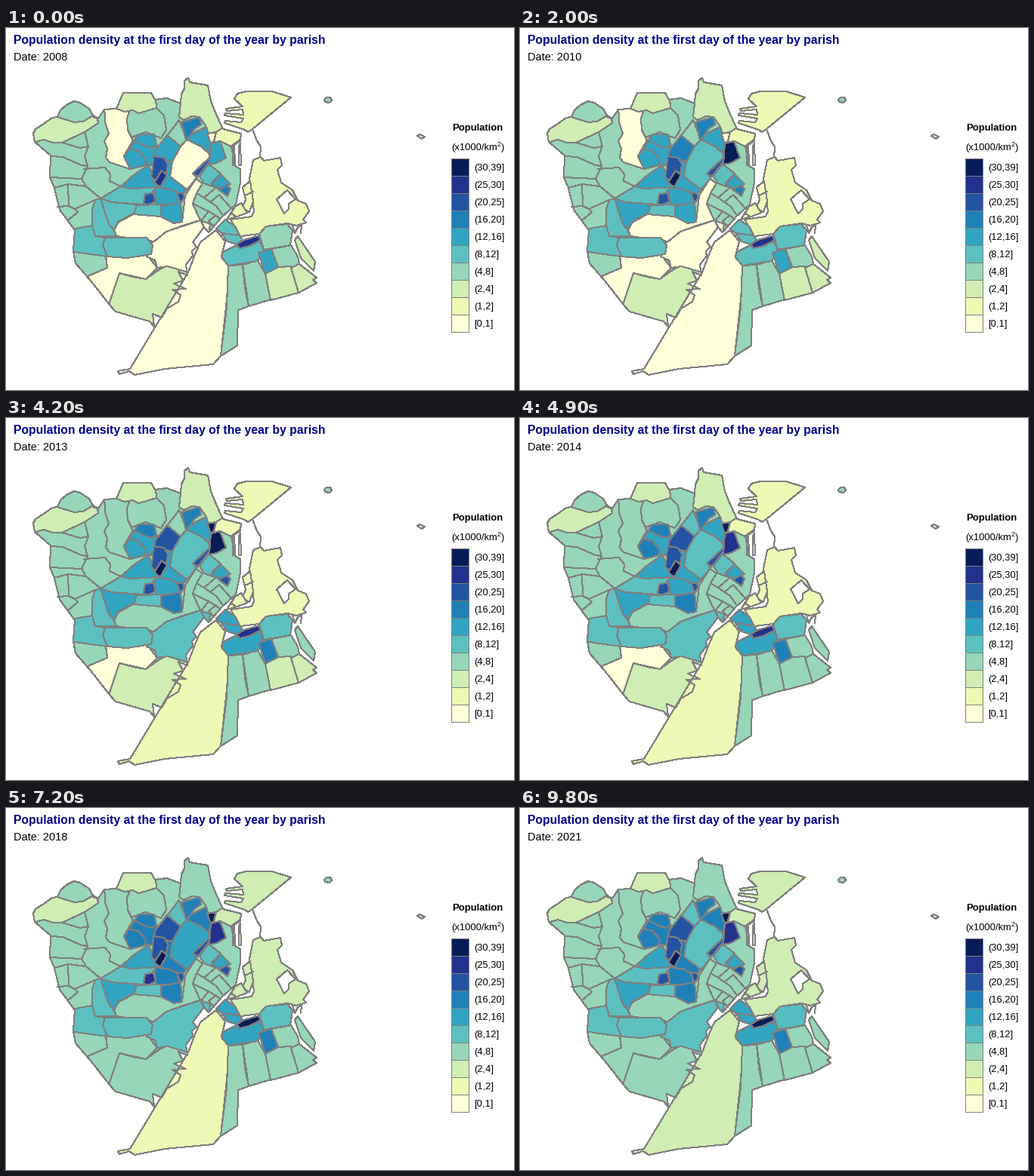
Recreate the animation shown at these times as a matplotlib script. Size 672x480 px, loop 10 s.

```python
import numpy as np
import matplotlib.pyplot as plt
from matplotlib.animation import FuncAnimation
from matplotlib.patches import Polygon, Rectangle

plt.rcParams["font.family"] = ["Liberation Sans", "DejaVu Sans"]

W, H, DPI = 672, 480, 96
STEP = 100
FRAMES = 100
PX = 72 / DPI
GREY = "#7f7f7f"
CMAP = plt.get_cmap("YlGnBu")
BOUNDS = [0, 1, 2, 4, 8, 12, 16, 20, 25, 30, 39]
# moments at which the next year takes over
SWITCH = [600 + 800 * min(k, 3) + 700 * max(k - 3, 0) for k in range(13)]


def shade(level):
    """Colour of a density class; fractions blend two neighbours."""
    return CMAP(level / 9)


fig = plt.figure(figsize=(W / DPI, H / DPI), dpi=DPI, facecolor="white")
ax = fig.add_axes([0, 0, 1, 1])
ax.set_xlim(0, W)
ax.set_ylim(H, 0)
ax.axis("off")

parishes = []


def area(*flat, color="white", clip=None):
    patch = Polygon(np.reshape(flat, (-1, 2)), closed=True, facecolor=color,
                    edgecolor=GREY, linewidth=PX, antialiased=False,
                    zorder=len(ax.get_children()))
    ax.add_patch(patch)
    if clip is not None:
        patch.set_clip_path(clip)
    return patch


def parish(level, *flat, to=None, blend=None, clip=None):
    patch = area(*flat, color=shade(level), clip=clip)
    parishes.append((patch, level, to or {}, blend or {}))
    return patch


def border(*flat):
    x, y = np.reshape(flat, (-1, 2)).T
    ax.plot(x, y, color=GREY, lw=PX, antialiased=False,
            zorder=len(ax.get_children()))


def text(x, y, s, size, **kw):
    return ax.text(x, y, s, fontsize=size * PX, va="baseline", **kw)


# --- mainland: one coast, districts are cut off along it
land = parish(
    3, 36, 140, 39, 134, 50, 127, 61, 119, 68, 118, 72, 109, 80, 102, 90, 97,
    98, 99, 110, 107, 115, 116, 122, 120, 130, 108, 146, 107, 155, 86, 192, 86,
    197, 95, 213, 93, 231, 100, 232, 88, 236, 80, 236, 70, 241, 66, 243, 72,
    267, 76, 271, 97, 277, 112, 287, 134, 311, 140, 310, 150, 298, 157,
    303, 183, 310, 187, 310, 205, 304, 234, 285, 251, 268, 271, 262, 264,
    247, 284, 252, 290, 246, 296, 247, 302, 238, 314, 240, 328, 228, 323,
    234, 335, 222, 339, 238, 346, 220, 347, 231, 354, 228, 363, 213, 372,
    206, 384, 194, 379, 196, 396, 190, 389, 145, 376, 137, 367, 112, 335,
    92, 312, 89, 296, 91, 268, 71, 241, 64, 212, 58, 198, 59, 169, 38, 151)

border(104, 138, 109, 157, 104, 170, 108, 183, 100, 200, 106, 210, 125, 226)
border(74, 152, 98, 159, 109, 157)
border(59, 170, 75, 171, 100, 182, 108, 183)
border(58, 198, 100, 200)
border(103, 187, 131, 185, 138, 194, 137, 203, 152, 210)
border(64, 212, 82, 207, 106, 210)
border(82, 207, 83, 236, 91, 240, 118, 228)
border(68, 237, 83, 236)
border(82, 255, 95, 244, 91, 240)
border(199, 106, 209, 116, 212, 135, 205, 146, 185, 138, 166, 145)

parish(2, 30, 120, 68, 118, 102, 124, 113, 117, 121, 120, 122, 126, 104, 138,
       74, 152, 62, 152, 50, 148, 36, 152, clip=land)
parish(3, 68, 118, 68, 90, 120, 90, 115, 116, 102, 124, 90, 125, clip=land,
       to={2015: 4, 2016: 3, 2019: 4, 2020: 3})
parish(0, 130, 100, 163, 111, 160, 120, 161, 135, 168, 149, 156, 170, 164, 187,
       137, 178, 132, 172, 134, 160, 130, 150, 136, 140, 131, 125,
       clip=land, to={2013: 3})
parish(2, 146, 107, 146, 80, 197, 80, 199, 106, 176, 113, 167, 109, 157, 111,
       clip=land)
parish(2, 231, 100, 231, 60, 275, 60, 300, 136, 266, 140, 265, 131, 256, 118,
       246, 117, 235, 122, 229, 118, clip=land, to={2018: 3})
parish(1, 271, 153, 278, 138, 290, 130, 320, 140, 298, 157, 283, 150,
       clip=land, to={2015: 2})

parish(0, 108, 329, 134, 318, 132, 303, 186, 300, 200, 318, 185, 333, 150, 325,
       137, 367, 100, 340, clip=land, to={2016: 3})
parish(2, 150, 325, 168, 330, 185, 333, 200, 322, 214, 314, 250, 325, 250, 400,
       125, 400, clip=land, to={2018: 3})
parish(0, 186, 290, 212, 270, 257, 255, 270, 260, 260, 330, 214, 316, 200, 318,
       197, 308, 186, 303, clip=land, to={2013: 4})
parish(0, 143, 268, 148, 258, 170, 246, 205, 250, 233, 257, 237, 222, 251, 200,
       260, 206, 252, 219, 247, 233, 257, 255, 234, 262, 212, 270, 196, 283,
       146, 276, to={2013: 3})
parish(3, 80, 295, 132, 302, 134, 318, 108, 329, 90, 330, clip=land)
parish(4, 80, 268, 114, 262, 118, 276, 131, 278, 128, 288, 134, 303, 105, 299,
       80, 295, clip=land)
parish(4, 131, 278, 186, 278, 194, 288, 192, 300, 160, 305, 134, 303, 128, 288)
parish(4, 118, 228, 125, 226, 133, 248, 146, 276, 118, 276, 114, 262, 114, 240)
parish(4, 125, 226, 152, 210, 199, 211, 182, 234, 140, 231)
parish(4, 173, 235, 206, 234, 205, 250, 168, 247)
parish(4, 125, 226, 140, 231, 173, 234, 170, 245, 148, 257, 143, 268, 136, 260,
       131, 245, to={2010: 5})

# --- dense centre
parish(3, 213, 143, 229, 122, 239, 148, 231, 158, to={2014: 4})
parish(0, 231, 157, 239, 148, 258, 157, 268, 166, 270, 172, 248, 193, 252, 199,
       239, 215, 226, 206, 217, 197, 220, 177,
       to={2009: 4, 2017: 5, 2021: 4}, blend={2016: 4.5})
parish(5, 152, 210, 170, 194, 188, 182, 203, 211, 165, 213)
parish(5, 211, 173, 220, 177, 217, 197, 239, 214, 234, 220, 203, 211,
       to={2015: 6})
parish(5, 197, 212, 215, 213, 226, 219, 230, 232, 216, 234, 198, 234,
       to={2015: 6})
parish(5, 205, 236, 231, 231, 233, 257, 222, 259, 205, 250, to={2011: 6})
parish(5, 163, 160, 170, 149, 200, 156, 193, 182, 184, 181, to={2015: 6})
parish(5, 163, 160, 175, 163, 185, 174, 184, 182, 164, 187, 156, 170,
       to={2014: 6})
parish(5, 170, 149, 175, 141, 196, 141, 199, 155, 193, 159, 183, 156,
       to={2011: 6})
parish(5, 197, 163, 213, 142, 231, 157, 220, 177, 196, 171,
       to={2010: 6, 2013: 7})
parish(7, 195, 170, 209, 172, 214, 180, 213, 190, 199, 205, 192, 197, 194, 186)
parish(8, 206, 189, 213, 195, 204, 211, 196, 205, to={2010: 9})
parish(7, 184, 220, 195, 219, 198, 230, 187, 235, 182, 232,
       to={2017: 8, 2021: 7}, blend={2016: 7.5})
parish(7, 226, 219, 234, 219, 236, 225, 231, 232)
parish(5, 245, 141, 265, 131, 271, 153, 268, 166, 258, 157, 239, 148,
       to={2015: 6})
parish(6, 232, 125, 256, 118, 258, 128, 249, 134, 245, 141, 238, 148)
parish(0, 266, 140, 278, 138, 275, 150, 271, 153, to={2013: 9})

# --- old town
border(252, 219, 262, 225, 276, 213)
border(262, 225, 278, 236, 286, 247)
border(247, 233, 268, 243, 284, 253)
border(268, 243, 258, 256, 262, 264)
border(270, 231, 282, 221, 297, 238)
border(278, 248, 268, 256, 275, 264)
parish(4, 256, 196, 268, 180, 284, 193, 272, 205, 281, 213, 262, 206)
parish(5, 272, 207, 284, 194, 297, 207, 281, 213)
parish(6, 281, 214, 292, 209, 297, 213, 293, 223, to={2013: 7})
parish(7, 270, 171, 269, 177, 254, 197, 247, 193)
parish(5, 271, 153, 283, 150, 291, 172, 279, 179, 269, 181,
       to={2010: 9, 2014: 8})
for x in (300, 308):
    area(x, 157, x + 2, 153, x + 3, 182, x, 182)
border(326, 134, 332, 150, 337, 157, 336, 172)

# --- harbour districts, one unit in several pieces
parish(1, 306, 87, 318, 84, 352, 84, 377, 92, 326, 134, 320, 138, 316, 135,
       289, 126, 290, 123, 311, 125, 314, 120, 289, 116, 290, 113, 314, 115,
       313, 108, 292, 110, 291, 107, 313, 104, 302, 94, to={2015: 2})
parish(1, 327, 175, 337, 171, 341, 176, 363, 172, 365, 182, 359, 188, 364, 205,
       379, 215, 386, 229, 397, 233, 401, 243, 393, 254, 397, 258, 384, 262,
       372, 259, 344, 263, 335, 273, 310, 276, 297, 254, 325, 250, 328, 243,
       322, 200, to={2015: 2})
parish(1, 313, 211, 323, 203, 327, 230, 322, 244, 312, 239, 317, 228,
       to={2015: 2})
parish(1, 303, 237, 311, 232, 319, 245, 306, 250, 292, 254, to={2015: 2})
parish(1, 544, 143, 547, 141, 554, 144, 550, 147, to={2015: 2})
border(316, 222, 327, 217)
border(297, 245, 304, 250)
area(358, 227, 372, 215, 383, 227, 374, 233, 374, 240, 368, 246)
parish(3, 421, 95, 424, 92, 429, 92, 431, 96, 428, 99, 422, 98)

# --- southern island
parish(0, 278, 268, 290, 283, 285, 303, 295, 316, 292, 360, 284, 435, 274, 446,
       210, 452, 170, 460, 163, 455, 150, 459, 148, 455, 164, 452, 200, 392,
       241, 324, 250, 300, 257, 284, to={2013: 1, 2019: 2})
parish(4, 278, 266, 290, 254, 303, 263, 309, 275, 285, 272, to={2012: 5})
parish(4, 285, 272, 309, 275, 313, 281, 305, 287, 293, 283, to={2013: 5})
parish(3, 294, 315, 313, 314, 316, 345, 321, 369, 307, 374, 306, 421, 284, 435,
       292, 370)
parish(3, 313, 314, 333, 308, 343, 326, 350, 360, 321, 369)
parish(3, 351, 293, 377, 288, 386, 303, 388, 313, 377, 318, 360, 318)
parish(2, 343, 326, 360, 317, 377, 316, 387, 351, 350, 361, to={2014: 3})
parish(2, 377, 318, 388, 313, 411, 331, 406, 334, 411, 338, 387, 351,
       to={2014: 3})
parish(2, 382, 281, 386, 276, 396, 291, 409, 310, 407, 322, 390, 305,
       to={2013: 3})
border(379, 262, 382, 272, 386, 264, 391, 262, 390, 272)
parish(3, 335, 273, 344, 263, 372, 260, 379, 268, 376, 288, 341, 294,
       to={2009: 4}, blend={2021: 4.15})
parish(4, 287, 297, 305, 288, 336, 283, 341, 294, 333, 309, 294, 315, 285, 304,
       to={2013: 5})
parish(5, 334, 298, 351, 293, 360, 317, 343, 326, to={2012: 6})
parish(8, 305, 287, 315, 281, 335, 275, 336, 282, 322, 289, 309, 292,
       to={2015: 9})

# --- text and legend
text(10, 21, "Population density at the first day of the year by parish", 15.8,
     color="darkblue", weight="bold")
date = text(10, 43, "", 14.5)
text(590, 136, "Population", 13.1, weight="bold")
text(589, 162, "(x1000/km", 13)
text(650, 157, "2", 9)
text(655, 162, ")", 13)
for i, (low, high) in enumerate(zip(BOUNDS, BOUNDS[1:])):
    top = 380 - 23 * i
    ax.add_patch(Rectangle((589, top), 23, 23, facecolor=shade(i),
                           edgecolor=GREY, linewidth=PX, antialiased=False))
    text(619, top + 16, f"{'(' if i else '['}{low},{high}]", 12.9)


def update(frame):
    t = frame * STEP
    passed = sum(t >= s for s in SWITCH)
    year = 2008 + passed
    ends = (SWITCH + [FRAMES * STEP])[passed]
    turning = ends - t <= 200
    for patch, level, to, blend in parishes:
        for since, value in to.items():
            if year >= since:
                level = value
        if turning:
            level = blend.get(year, level)
        patch.set_facecolor(shade(level))
    date.set_text(f"Date: {year}")
    return [p[0] for p in parishes] + [date]


# the coast goes over the cut edges
area(*land.get_xy()[:-1].ravel(), color="none")

anim = FuncAnimation(fig, update, frames=FRAMES, interval=STEP,
                     repeat=True, repeat_delay=0, blit=False)
plt.show()
```
